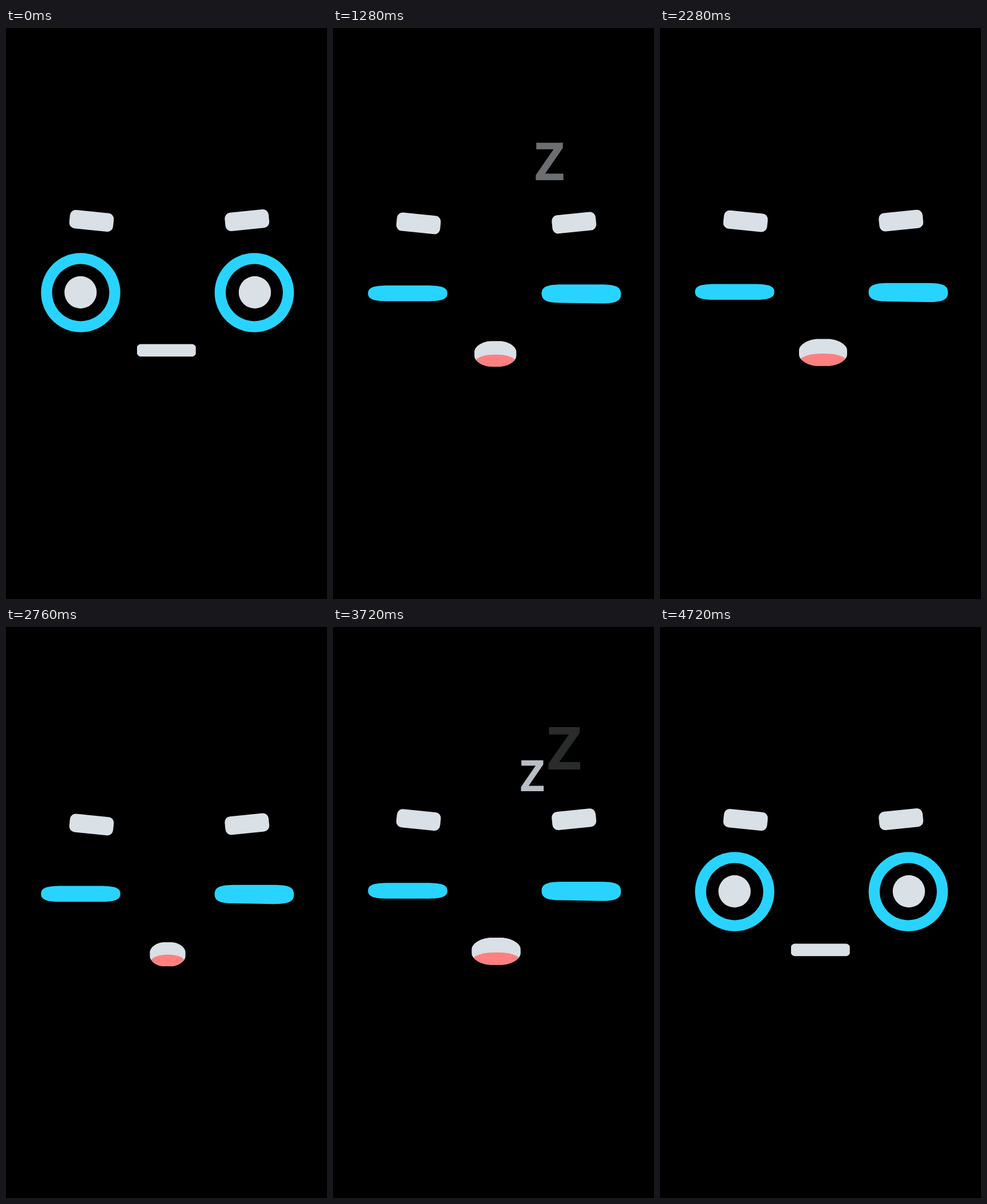
These frames come from a looping animation (561x998 px, 5 s). An HTML page:

```html
<!DOCTYPE html>
<html>
<head>
<meta charset="utf-8">
<title>Sleepy face</title>
<style>
html, body { margin: 0; width: 100%; height: 100%; overflow: hidden; background: #000; }
svg { display: block; width: 100vw; height: 100vh; }
text { font: 700 100px "Open Sans", "Noto Sans", sans-serif; text-anchor: middle; }
</style>
</head>
<body>
<svg viewBox="0 0 561 998">
  <defs><clipPath id="lips"><path id="lipsPath"/></clipPath></defs>
  <g fill="#d9e0e6">
    <g id="brows">
      <rect x="-38.5" y="-16.1" width="77" height="32.2" rx="10" transform="translate(149.5 337) rotate(5.8)"/>
      <rect x="-38.5" y="-16.1" width="77" height="32.2" rx="10" transform="translate(421.2 336) rotate(-5.8)"/>
    </g>
    <g id="eyes"></g>
    <path id="mouth"/>
    <ellipse id="tongue" fill="#ff8080" clip-path="url(#lips)"/>
    <g id="zs"></g>
  </g>
</svg>
<script>
const LOOP = 5000, STEP = 40, WAKE = 4720;
const BREATH = 1348, BREATH_PEAK = 1690;
const Z_STARTS = [482, 937, 1376, 3170, 3619, 4090], Z_LIFE = 680;
const CAP_HEIGHT = 0.714;

const $ = id => document.getElementById(id);
const lerp = (a, b, k) => a + (b - a) * k;
const ease = (t, from, to) => {
  const k = Math.min(1, Math.max(0, (t - from) / (to - from)));
  return (1 - Math.cos(Math.PI * k)) / 2;
};

function add(parent, tag, attrs = {}) {
  const el = document.createElementNS("http://www.w3.org/2000/svg", tag);
  set(el, attrs);
  return parent.appendChild(el);
}

function set(el, attrs) {
  for (const name in attrs) el.setAttribute(name, attrs[name]);
}

// Box with soft corners of size cx by cy; k is the roundness, sag lowers the right bottom corner.
function blob(l, t, r, b, cx, cy, k, sag = 0) {
  const ix = cx * (1 - k), iy = cy * (1 - k), br = b + sag;
  return `M${l} ${t + cy}C${l} ${t + iy} ${l + ix} ${t} ${l + cx} ${t}` +
    `L${r - cx} ${t}C${r - ix} ${t} ${r} ${t + iy} ${r} ${t + cy}` +
    `L${r} ${br - cy}C${r} ${br - iy} ${r - ix} ${br} ${r - cx} ${br}` +
    `L${l + cx} ${b}C${l + ix} ${b} ${l} ${b - iy} ${l} ${b - cy}Z`;
}

const eyes = [
  { x: 130.5, pupil: 130.3, shut: 13.8, drop: 0, sag: 0 },
  { x: 433.9, pupil: 434.9, shut: 16.1, drop: 0.5, sag: 1.2 }
].map(eye => ({
  ...eye,
  ring: add($("eyes"), "path", { fill: "#28d4ff" }),
  hole: add($("eyes"), "ellipse", { fill: "#000", cx: eye.x }),
  iris: add($("eyes"), "ellipse", { cx: eye.pupil, rx: 28.2 })
}));

const zs = Z_STARTS.map(start => {
  const el = add($("zs"), "text");
  el.textContent = "Z";
  return { start, el };
});

function drawEye(eye, shut, breath) {
  const rx = 69.3;
  const ry = lerp(rx, eye.shut, shut);
  const y = lerp(462.5, 460.9 + eye.drop + 0.66 * breath, shut);
  const inner = Math.max(0, ry - 19.4);
  set(eye.ring, {
    d: blob(eye.x - rx, y - ry, eye.x + rx, y + ry,
      lerp(rx, 36, shut), ry, lerp(0.5523, 0.74, shut), eye.sag * shut)
  });
  set(eye.hole, { cy: y, rx: inner ? rx - 19.4 : 0, ry: inner });
  set(eye.iris, { cy: y - 0.5, ry: Math.min(28.2, inner * 0.565) });
}

function drawMouth(open, breath, nudge) {
  const l = lerp(229, 242.3 + 1.09 * breath, open);
  const r = lerp(331.7, 328 - 1.72 * breath, open);
  const t = lerp(552.6 + nudge, 543 + 0.95 * breath, open);
  const b = lerp(574.2 + nudge, 590.4 + 0.3 * breath, open);
  const w = r - l;
  const d = blob(l, t, r, b, lerp(6, w * 0.4, open), lerp(5, (b - t) * 0.42, open), lerp(0.35, 0.5, open));
  set($("mouth"), { d });
  set($("lipsPath"), { d });
  set($("tongue"), {
    cx: (l + r) / 2 + 0.3,
    cy: 580.6 + 0.47 * breath + 26 * (1 - open),
    rx: w * 0.475,
    ry: 12
  });
}

function drawZ(z, t, awake) {
  const p = (t - z.start) / Z_LIFE;
  const shown = !awake && p >= 0 && p < 0.923;
  z.el.style.display = shown ? "" : "none";
  if (!shown) return;
  const scale = (48.5 + 32.3 * p) / (100 * CAP_HEIGHT);
  set(z.el, {
    transform: `translate(${335.7 + 84.8 * p} ${295.6 - 58 * p}) scale(${scale})`,
    opacity: 1 - p
  });
}

function draw(t) {
  const awake = t >= WAKE;
  const sleep = awake ? 0 : ease(t, 0, 400);
  const breath = 6.6 + 6.5 * Math.cos(2 * Math.PI * (t - BREATH_PEAK) / BREATH);
  set($("brows"), { transform: `translate(0 ${sleep * breath})` });
  for (const eye of eyes) drawEye(eye, sleep, breath);
  drawMouth(sleep, breath, awake ? 1 : 0);
  for (const z of zs) drawZ(z, t, awake);
}

const begin = performance.now();
function tick() {
  const t = (performance.now() - begin) % LOOP;
  draw(Math.floor(t / STEP) * STEP);
  requestAnimationFrame(tick);
}
tick();
</script>
</body>
</html>
```
